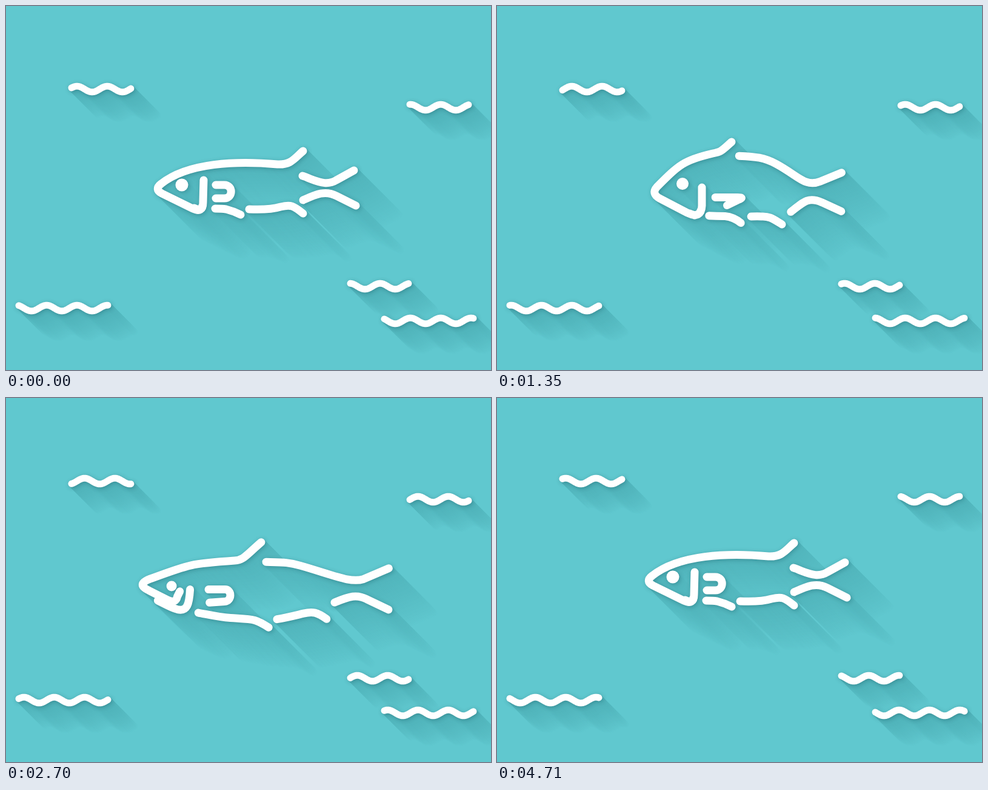
Animation, 800 px wide and 600 px high, one loop 4740 ms. Source, as an HTML page with a canvas:

```html
<!DOCTYPE html>
<html lang="en">
<head>
<meta charset="utf-8">
<title>Swimming fish</title>
<style>
  html, body { margin: 0; height: 100%; overflow: hidden; background: #60c8cf; }
  canvas { display: block; }
</style>
</head>
<body>
<canvas id="stage" width="800" height="600"></canvas>
<script>
const ctx = document.getElementById('stage').getContext('2d');
const LOOP = 4740, BEAT = 1200;
const WATER = [96, 200, 207], SHADE = [78, 177, 184];

// When a part morphs inside each beat: [start, duration] in ms
const BODY = [0, 490], HEAD = [147, 306];

// Every part has one path per fish; the commands agree so the numbers can be mixed
const parts = [
  { time: HEAD, poses: [ // back, snout and gill
    'M490,239 C475,252 470,262 448,261 C380,255 300,258 256,293 Q244,302 257,309 L308,334 Q325,342 325,324 L326,287',
    'M387,224 C371,238 371,240 356,243 C308,254 300,262 264,298 Q254,309 268,317 L314,341 Q337,352 338,329 L338,299',
    'M424,226 C394,257 391,265 375,267 C300,275 297,275 236,301 Q214,311 236,321 L275,340 Q299,352 300,324 L301,303',
    'M418,249 C395,264 393,269 379,269 C308,271 306,274 238,296 Q214,304 236,314 L258,326 Q262,328 266,330 L273,334'] },
  { time: HEAD, poses: [ // lower jaw, hidden in the corner of the gill until it opens
    'M310,333 C313,334 315,335 318,336 C321,336 323,333 324,329',
    'M318,342 C320,343 323,344 326,345 C332,344 335,341 336,337',
    'M284,343 C286,344 288,345 290,345 C294,344 296,342 297,338',
    'M218,325 C240,336 258,347 276,352 C304,360 308,338 310,294'] },
  { time: BODY, poses: [ // upper tail
    'M489,280 C493,281 497,283 502,285 C520,292 532,295 545,287 L574,271',
    'M397,244 C425,245 438,246 459,258 C495,279 505,299 530,289 L563,275',
    'M416,271 C440,274 458,276 478,281 C516,291 535,299 556,291 L609,273',
    'M433,270 C462,270 468,269 488,275 C550,293 578,307 599,301 L638,283'] },
  { time: BODY, poses: [ // lower tail
    'M490,320 C510,311 526,303 545,313 L577,329',
    'M482,341 C505,321 512,315 533,324 L563,338',
    'M505,327 C530,318 538,314 556,321 L604,342',
    'M553,340 C578,329 591,326 607,335 L639,351'] },
  { time: BODY, poses: [ // side fin
    'M346,295 L360,295 C375,295 375,317 360,317 L346,317',
    'M364,316 L402,316 C412,316 410,318 403,320 L385,329',
    'M331,311 L358,311 C364,311 362,314 356,317 L338,325',
    'M335,317 L362,317 C376,317 376,341 362,341 L335,341'] },
  { time: BODY, poses: [ // front belly
    'M345,334 C351,334 357,334 363,335 C371,337 379,340 387,344',
    'M354,346 C360,346 366,346 372,346 C382,347 389,350 397,357',
    'M318,344 C345,349 375,351 408,351 C424,352 428,355 441,362',
    'M317,357 C333,360 344,364 359,366 C405,369 405,366 431,383'] },
  { time: BODY, poses: [ // rear belly
    'M401,335 C425,336 440,335 453,331 C470,327 474,329 490,342',
    'M415,347 C421,347 426,347 432,348 C445,348 451,353 465,361',
    'M450,347 C458,344 464,342 470,339 C486,333 494,340 508,352',
    'M446,370 C466,367 478,364 497,360 C512,357 519,357 535,368'] }
];
const eyes = ['290,295,10.5', '306,293,10', '267,313,9', '279,307,8'];

// Left end, right end, middle height
const waves = [[108, 206, 137], [666, 763, 167], [568, 664, 462], [21, 168, 498], [624, 771, 519]];

const ease = p => p < 0.5 ? 4 * p ** 3 : 1 - 4 * (1 - p) ** 3;

function morph(poses, [start, duration], t) {
  const beat = Math.floor(t / BEAT);
  const k = ease(Math.min(1, Math.max(0, (t % BEAT - start) / duration)));
  const goal = poses[(beat + 1) % 4].match(/[\d.]+/g);
  let i = 0;
  return poses[beat % 4].replace(/[\d.]+/g, n => +n + (goal[i++] - n) * k);
}

function fishPath(t) {
  const path = new Path2D(parts.map(p => morph(p.poses, p.time, t)).join(' '));
  const [x, y, r] = morph(eyes, HEAD, t).split(',').map(Number);
  path.moveTo(x + r - 6.5, y);
  path.arc(x, y, r - 6.5, 0, 7);
  return path;
}

function wavesPath(t) {
  const path = new Path2D();
  for (const [left, right, y] of waves) {
    for (let x = left; x <= right; x++) {
      const phase = 2 * Math.PI * ((x - 167) / 50 - t / BEAT);
      path[x === left ? 'moveTo' : 'lineTo'](x, y - 4.8 * Math.cos(phase));
    }
  }
  return path;
}

function longShadow(path, width, length, strength) {
  ctx.lineWidth = width;
  for (let d = length; d > 0; d--) {
    const k = strength * (1 - d / length) ** 0.75;
    ctx.strokeStyle = `rgb(${WATER.map((c, i) => c + (SHADE[i] - c) * k)})`;
    ctx.setTransform(1, 0, 0, 1, d, d);
    ctx.stroke(path);
  }
  ctx.resetTransform();
}

function whiteLine(path, width) {
  ctx.save();
  ctx.lineWidth = width;
  ctx.strokeStyle = '#fff';
  ctx.shadowColor = 'rgba(0, 60, 70, 0.3)';
  ctx.shadowBlur = 7;
  ctx.shadowOffsetX = ctx.shadowOffsetY = 1.5;
  ctx.stroke(path);
  ctx.restore();
}

function draw() {
  const t = performance.now() % LOOP;
  const fish = fishPath(t), sea = wavesPath(t);
  ctx.fillStyle = `rgb(${WATER})`;
  ctx.fillRect(0, 0, 800, 600);
  ctx.lineCap = ctx.lineJoin = 'round';
  longShadow(sea, 11, 45, 1);
  longShadow(fish, 13, 74, 0.85);
  whiteLine(sea, 11);
  whiteLine(fish, 13);
  requestAnimationFrame(draw);
}
draw();
</script>
</body>
</html>
```
